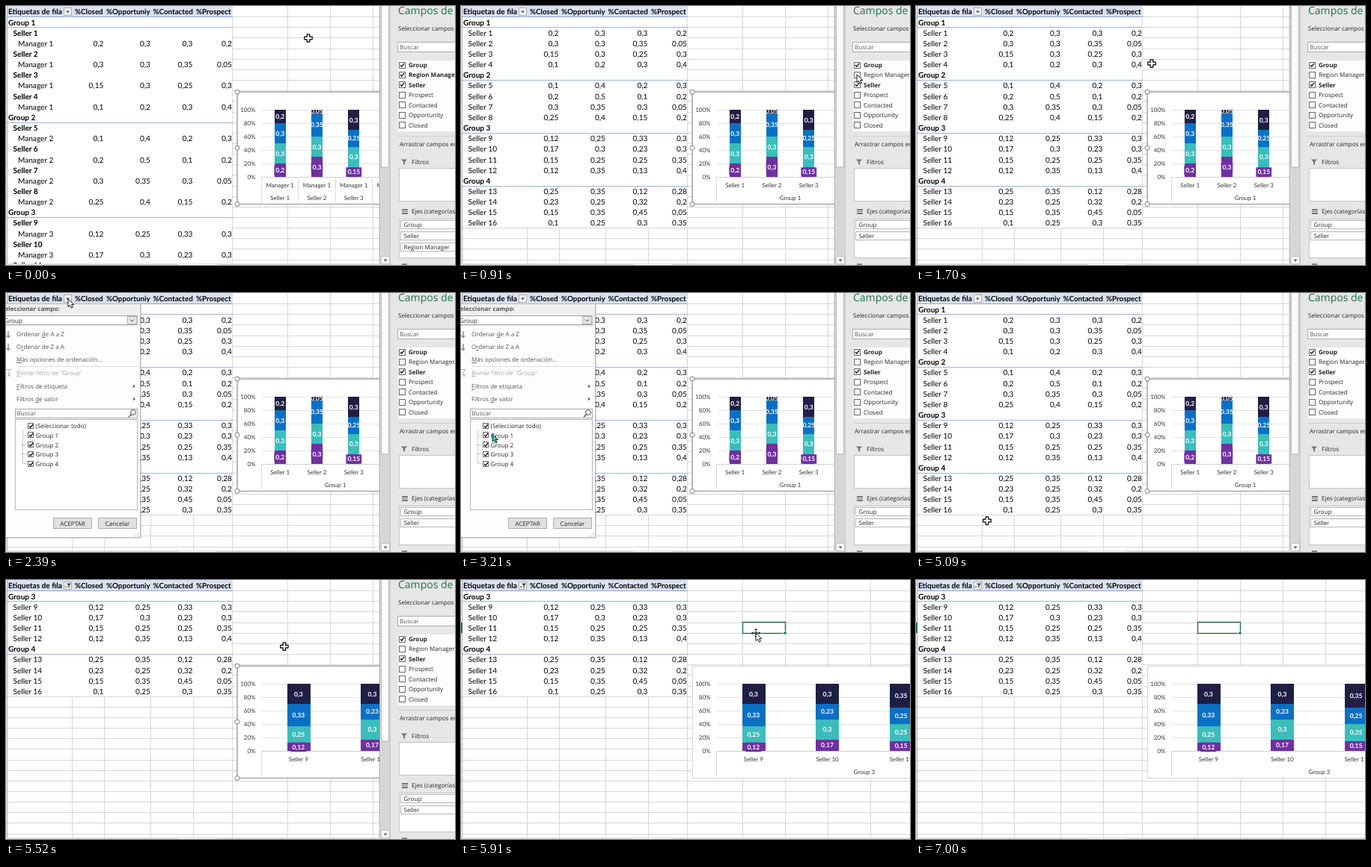
Write an HTML page that moves like this. It is 600x347 px and loops after 7.09 s.

```html
<!DOCTYPE html>
<html lang="es">
<head>
<meta charset="utf-8">
<title>Filtro de tabla dinámica</title>
<style>
html, body { margin: 0; height: 100%; overflow: hidden; background: #fff; }
svg { display: block; width: 100%; height: 100%; }
text { font: 8.1px "Open Sans", "Noto Sans", sans-serif; fill: #262626; white-space: pre; text-rendering: geometricPrecision; }
.cell { font: 10.1px Lato, Roboto, sans-serif; fill: #000; }
.axis { font: 8px Lato, Roboto, sans-serif; fill: #333; }
.val { font: bold 8.5px Lato, Roboto, sans-serif; fill: #fff; }
.title { font-size: 14px; fill: #217346; }
.b { font-weight: bold; }
.head { font-size: 9.8px; }
.end { text-anchor: end; }
.mid { text-anchor: middle; }
.soft { fill: #555; }
.dim { fill: #a6a6a6; }
.white { fill: #fff; }
.key { text-decoration: underline; }
line { shape-rendering: crispEdges; }
</style>
</head>
<body>
<svg id="stage" viewBox="0 0 600 347" xmlns="http://www.w3.org/2000/svg"></svg>
<script>
const LOOP = 7090, STEP = 100, END = 71;
const ROW = 14.15, TOP = 0.5;
const COLS = [88.5, 131, 193.5, 250, 302.5, 376.5, 433.5, 490, 547];
const SERIES = ['#7030a0', '#3bbdbb', '#0a70c4', '#1f1f45'];
// closed, opportunity, contacted (prospect is the remainder)
const SELLERS = [
  [20, 30, 30], [30, 30, 35], [15, 30, 25], [10, 20, 30],
  [10, 40, 20], [20, 50, 10], [30, 35, 30], [25, 40, 15],
  [12, 25, 33], [17, 30, 23], [15, 25, 25], [12, 35, 13],
  [25, 35, 12], [23, 25, 32], [15, 35, 45], [10, 25, 30]
].map(r => [...r, 100 - r[0] - r[1] - r[2]]);

// ticks at which the interface changes
const UNCHECK_FIELD = 7, DROP_MANAGER = 8, OPEN = 24, PICK_1 = 34, OFF_1 = 36,
  PICK_2 = 40, OFF_2 = 44, CLOSE = 50, FILTER = 53, LEAVE_CHART = 57;

const num = v => String(v / 100).replace('.', ',');
const text = (x, y, s, cls = '') => `<text x="${x}" y="${y}" class="${cls}">${s}</text>`;
const key = c => `<tspan class="key">${c}</tspan>`;
const rect = (x, y, w, h, fill, stroke = 'none', sw = 1) =>
  `<rect x="${x}" y="${y}" width="${w}" height="${h}" fill="${fill}" stroke="${stroke}" stroke-width="${sw}"/>`;
const line = (x1, y1, x2, y2, c, extra = '') =>
  `<line x1="${x1}" y1="${y1}" x2="${x2}" y2="${y2}" stroke="${c}" ${extra}/>`;
const path = (d, fill, stroke = 'none', sw = 1) =>
  `<path d="${d}" fill="${fill}" stroke="${stroke}" stroke-width="${sw}"/>`;
const show = (from, to, body) => `<g data-from="${from}" data-to="${to}">${body}</g>`;
const range = n => [...Array(n).keys()];
const rowY = i => TOP + ROW * i;
const baseY = i => 11.4 + ROW * i;

function sheet() {
  let s = rect(0, 0, 600, 347, '#fff');
  for (let i = 1; i < 25; i++) s += line(0, rowY(i), 600, rowY(i), '#d6d6da');
  for (const x of COLS) s += line(x, 0, x, 345, '#d6d6da');
  s += line(1.5, 0, 1.5, 345, '#a8a8a8');
  s += rect(2, 0, 301, 14, '#d9e1f2') + line(2, 14.5, 303, 14.5, '#8ea9db');
  s += text(3, baseY(0), 'Etiquetas de fila', 'cell b');
  ['%Closed', '%Opportuniy', '%Contacted', '%Prospect'].forEach((h, i) => {
    s += text([92, 134, 196.5, 254][i], baseY(0), h, 'cell b head');
  });
  s += rect(77.5, 2.5, 10, 10, '#f7f7f7', '#a9adb5');
  s += show(0, FILTER, path('M80 6.5h5l-2.5 3z', '#555'));
  s += show(FILTER, END, path('M81 4.5h6l-2.3 3v3.5l-1.4-1v-2.5z', '#444') + path('M78.5 8.5h3l-1.5 2z', '#444'));
  return s;
}

function pivot(groups, managers) {
  const rows = [];
  for (const g of groups) {
    rows.push({ label: 'Group ' + g, x: 3, bold: true, group: true });
    for (let k = g * 4 - 4; k < g * 4; k++) {
      rows.push({ label: 'Seller ' + (k + 1), x: 9.5, bold: managers, data: !managers && SELLERS[k] });
      if (managers) rows.push({ label: 'Manager ' + g, x: 16, data: SELLERS[k] });
    }
  }
  const visible = rows.slice(0, 24);
  let s = rect(2, 15, 300, Math.floor(visible.length * ROW - 0.5), '#fff');
  visible.forEach((r, i) => {
    s += text(r.x, baseY(i + 1), r.label, 'cell' + (r.bold ? ' b' : ''));
    if (r.group) s += line(2, rowY(i + 2), 303, rowY(i + 2), '#9db4df');
    if (r.data) r.data.forEach((v, c) => { s += text(COLS[c + 1] - 0.6, baseY(i + 1), num(v), 'cell end'); });
  });
  return s;
}

function chart(groups, managers) {
  const x0 = 341.5, y0 = 229, span = 789;
  const ids = groups.flatMap(g => range(4).map(k => g * 4 - 4 + k));
  const step = span / ids.length, bar = step * 0.31;
  let s = rect(309.5, 115.5, 850, 150, '#fff', '#d4d4d4');
  for (let p = 0; p <= 100; p += 20) {
    const y = y0 + 0.5 - p * 0.9;
    s += line(x0, y, 600, y, p ? '#e2e2e2' : '#cfcfcf') + text(333.5, y + 2.6, p + '%', 'axis end');
  }
  const mark = x => line(x, 229, x, 263, '#d9d9d9');
  s += mark(x0);
  let labels = '';
  ids.slice(0, 4).forEach((id, i) => {
    const cx = x0 + step * (i + 0.5), left = Math.round(cx - bar / 2), width = Math.round(bar);
    let y = y0;
    SELLERS[id].forEach((v, k) => {
      const top = y - v * 0.9, mid = (y + top) / 2;
      s += rect(left, Math.round(top), width, Math.round(y) - Math.round(top), SERIES[k]);
      const label = num(v);
      if (!k) labels += rect(cx - label.length * 2.6, mid - 6, label.length * 5.2, 12.5, SERIES[0]);
      labels += text(cx, mid + 3, label, 'val mid');
      y = top;
    });
    if (managers) {
      s += text(cx, 243, 'Manager ' + Math.ceil((id + 1) / 4), 'axis mid') + mark(cx + step / 2);
    }
    s += text(cx, managers ? 260 : 243, 'Seller ' + (id + 1), 'axis mid');
  });
  if (!managers) s += text(x0 + step * 2, 259.5, 'Group ' + groups[0], 'axis mid') + mark(x0 + step * 4);
  return s + labels;
}

function selectedChart() {
  return rect(309, 115.2, 850, 150.3, 'none', '#a8a8a8', 1.5) +
    [115, 190, 265.5].map(y => `<circle cx="309" cy="${y}" r="3" fill="#fff" stroke="#808080"/>`).join('');
}

function checkbox(x, y, state, size = 8) {
  const mark = {
    on: path(`M${x + 2} ${y + 4.2}l1.8 2 3.2-4.4`, 'none', '#111', 1.4),
    some: rect(x + 2, y + 2, size - 3, size - 3, '#111')
  };
  return rect(x + 0.5, y + 0.5, size, size, '#fff', '#666') + (mark[state] || '');
}

function field(name, i, on) {
  const y = 79 + i * 13.45;
  return checkbox(525, Math.round(y - 4.5), on ? 'on' : '') + text(538, y + 3, name, on ? 'b' : '');
}

const chip = (name, i) =>
  rect(527.5, 287.5 + i * 15, 80, 11, '#fff', '#b5b5b5') + text(531.5, 296 + i * 15, name);

function pane() {
  let s = rect(500, 0, 100, 347, '#e6e6e6') + line(499.5, 0, 499.5, 345, '#9f9f9f');
  s += rect(501, 0, 12, 347, '#d6d6d6') + rect(501.5, -2, 10, 218, '#fafafa', '#b5b5b5');
  s += rect(501.5, 335.5, 11, 10, '#fdfdfd', '#c4c4c4');
  s += path('M504.5 339.5h5l-2.5 3z', '#555') + line(513.5, 0, 513.5, 347, '#c6c6c6');
  s += text(524, 11, 'Campos de', 'title') + text(524, 33, 'Seleccionar campos');
  s += rect(523.5, 48.5, 90, 13, '#fff', '#ababab') + text(526, 58, 'Buscar', 'soft');
  s += rect(524, 73, 76, 95, '#fdfdfd');
  ['Group', 'Region Manager', 'Seller', 'Prospect', 'Contacted', 'Opportunity', 'Closed'].forEach((f, i) => {
    if (i === 1) s += show(0, UNCHECK_FIELD, field(f, i, true)) + show(UNCHECK_FIELD, END, field(f, i, false));
    else s += field(f, i, i < 3);
  });
  s += line(524, 174.5, 600, 174.5, '#d0d0d0') + text(526, 188, 'Arrastrar campos en');
  s += path('M528 205.5h8l-3 3.6v4l-2-1.2v-2.8z', '#777') + text(542, 212, 'Filtros');
  s += rect(525.5, 217.5, 90, 44, '#fff', '#c2c2c2');
  s += rect(529, 272, 8, 7, '#777') + line(529, 274.5, 537, 274.5, '#e6e6e6') + line(529, 276.5, 537, 276.5, '#e6e6e6');
  s += text(542, 278, 'Ejes (categorías)');
  s += rect(525.5, 285.5, 90, 52, '#fff', '#c2c2c2') + chip('Group', 0) + chip('Seller', 1);
  s += show(0, DROP_MANAGER, chip('Region Manager', 2));
  return s + rect(529, 345, 7, 2, '#888');
}

function option(label, i, state, hot) {
  const y = 178 + i * 12.75;
  return (hot ? rect(38, y - 6, 33, 12, '#0078d7') : '') +
    checkbox(29, Math.round(y - 4.5), state, 7) + text(39.5, y + 3, label, hot ? 'white' : '');
}

function button(x, label, active) {
  return rect(x + 0.5, 301.5, 51, 14, '#e1e1e1', active ? '#0078d7' : '#adadad', active ? 2 : 1) +
    text(x + 26, 311.7, label, 'mid');
}

function menu() {
  let s = rect(0, 15, 181, 314, 'rgba(0,0,0,.14)') + rect(-2, 14.5, 181.5, 313, '#fdfdfd', '#b8b8b8');
  s += rect(0, 15, 179, 30, '#f0f0f0') + text(-6, 24.2, 'Seleccionar campo:', 'b soft');
  s += rect(-3, 30.5, 178, 12, '#fff', '#a0a0a0') + rect(162.5, 31.5, 12, 10, '#e5e5e5', '#b5b5b5');
  s += path('M166 35.5l2.5 2.5 2.5-2.5', 'none', '#444') + text(-2, 39.5, 'Group');
  s += text(14, 58, `Ordenar ${key('d')}e A a Z`, 'soft') + text(14, 75, `O${key('r')}denar de Z a A`, 'soft');
  for (const y of [51, 68]) s += path(`M3 ${y}v8.5M0.5 ${y + 6}l2.5 2.7 2.5-2.7`, 'none', '#555');
  s += text(14, 92, `${key('M')}ás opciones de ordenación...`, 'soft') + line(14, 98.5, 178, 98.5, '#dedede');
  s += path('M-1 102.5h7l-2.7 3.5v2M2 108l4 4M6 108l-4 4', 'none', '#aaa');
  s += text(14, 110, `${key('B')}orrar filtro de &quot;Group&quot;`, 'dim');
  s += text(14, 128, `${key('F')}iltros de etiqueta`, 'soft') + text(14, 145, `Filtros ${key('d')}e valor`, 'soft');
  s += path('M170 122.5l3 2.5-3 2.5zM170 139.5l3 2.5-3 2.5z', '#666');
  s += rect(12.5, 155.5, 163, 12, '#fff', '#a6a6a6') + text(14.5, 164, 'Buscar', 'soft');
  s += '<circle cx="170" cy="160" r="3.4" fill="none" stroke="#444"/>' + path('M167.6 162.5l-3.6 3.7', 'none', '#444', 1.3);
  s += rect(12.5, 169.5, 163, 121, '#fff', '#b5b5b5');
  s += line(22.5, 184, 22.5, 229, '#999', 'stroke-dasharray="1 1"');
  for (let i = 1; i < 5; i++) {
    const y = Math.round(178 + i * 12.75) - 0.5;
    s += line(22, y, 28, y, '#999', 'stroke-dasharray="1 1"');
  }
  const all = '(Seleccionar todo)';
  s += show(OPEN, OFF_1, option(all, 0, 'on')) + show(OFF_1, CLOSE, option(all, 0, 'some'));
  s += show(OPEN, PICK_1, option('Group 1', 1, 'on')) + show(PICK_1, OFF_1, option('Group 1', 1, 'on', true));
  s += show(OFF_1, PICK_2, option('Group 1', 1, '', true)) + show(PICK_2, CLOSE, option('Group 1', 1, ''));
  s += show(OPEN, PICK_2, option('Group 2', 2, 'on')) + show(PICK_2, OFF_2, option('Group 2', 2, 'on', true));
  s += show(OFF_2, CLOSE, option('Group 2', 2, '', true));
  s += option('Group 3', 3, 'on') + option('Group 4', 4, 'on');
  s += show(OPEN, OFF_1, button(63, 'ACEPTAR')) + show(OFF_1, CLOSE, button(63, 'ACEPTAR', true));
  s += button(123, 'Cancelar');
  for (const [x, y] of [[176, 325], [173, 325], [176, 322]]) s += rect(x, y, 1, 1, '#888');
  return s;
}

const ARROW = 'M0 0v10.5l2.5-2.2 1.8 3.9 2-1-1.8-3.7h3.3z';
const CURSORS = {
  cross: path('M-1.8-5.2h3.6v3.4h3.4v3.6h-3.4v3.4h-3.6v-3.4h-3.4v-3.6h3.4z', '#fff', '#000', 1.2),
  arrow: path(ARROW, '#fff', '#000', 0.9),
  teal: path(ARROW, '#25c3ac', '#123', 0.9),
  move: path('M-5 0h10M0-5v10', 'none', '#222', 1) +
    path('M-6 0l2-2v4zM6 0l-2-2v4zM0-6l-2 2h4zM0 6l-2-2h4z', '#222') + path(ARROW, '#fff', '#000', 0.9)
};
// tick, x, y, pointer shape from here on
const TRACK = [
  [0, 404, 43, 'cross'], [4, 516, 86, 'arrow'], [5, 529, 92, 'arrow'], [9, 529, 92, 'arrow'],
  [10, 495, 90, 'cross'], [17, 315, 77, 'cross'], [22, 83, 8, 'arrow'], [25, 83, 8, 'teal'],
  [32, 42, 189, 'teal'], [34, 34, 191, 'teal'], [38, 34, 191, 'teal'], [40, 34, 204, 'teal'],
  [45, 34, 204, 'teal'], [48, 88, 309, 'teal'], [50, 93, 306, 'cross'], [51, 95, 305, 'cross'],
  [56, 404, 64, 'cross'], [58, 394, 71, 'move'], [63, 394, 71, 'cross'], [68, 612, 110, 'cross']
];

function pointerAt(tick) {
  const last = TRACK.length - 1;
  let i = 0;
  while (i < last - 1 && TRACK[i + 1][0] <= tick) i++;
  const [t0, xa, ya, kind] = TRACK[i], [t1, xb, yb] = TRACK[i + 1];
  const p = Math.min(1, (tick - t0) / (t1 - t0)), e = p * p * (3 - 2 * p);
  return { x: xa + (xb - xa) * e, y: ya + (yb - ya) * e, kind };
}

const ALL = [1, 2, 3, 4], KEPT = [3, 4];
const stage = document.getElementById('stage');
stage.innerHTML = sheet() +
  show(0, DROP_MANAGER, pivot(ALL, true) + chart(ALL, true)) +
  show(DROP_MANAGER, FILTER, pivot(ALL, false) + chart(ALL, false)) +
  show(FILTER, END, pivot(KEPT, false) + chart(KEPT, false)) +
  show(0, LEAVE_CHART, selectedChart()) +
  rect(0, 345, 600, 2, '#dcdcdc') + rect(230, 346, 52, 1, '#fff') +
  show(0, LEAVE_CHART, pane()) +
  show(LEAVE_CHART, END, rect(376.5, 56.5, 57, 15, 'none', '#217346', 1.4) +
    rect(431, 69, 4, 4, '#217346', '#fff', 0.8) + rect(0, 57, 2, 14, '#217346')) +
  show(OPEN, CLOSE, menu()) +
  '<g id="pointer"></g>';

const parts = [...stage.querySelectorAll('[data-from]')].map(el => ({ el, from: +el.dataset.from, to: +el.dataset.to }));
const pointer = document.getElementById('pointer');
let shown = -1, shape = '';

function render() {
  const tick = Math.floor((performance.now() % LOOP + 10) / STEP);
  if (tick !== shown) {
    shown = tick;
    for (const { el, from, to } of parts) el.style.display = tick >= from && tick < to ? '' : 'none';
    const { x, y, kind } = pointerAt(tick);
    if (kind !== shape) pointer.innerHTML = CURSORS[shape = kind];
    pointer.setAttribute('transform', `translate(${x.toFixed(1)} ${y.toFixed(1)})`);
  }
  requestAnimationFrame(render);
}
render();
</script>
</body>
</html>
```
